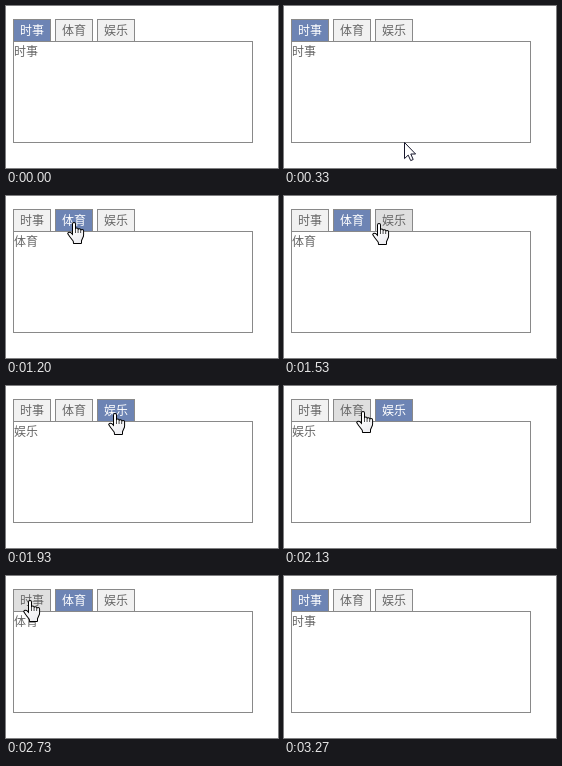
An HTML page with a canvas that plays this animation: 272 by 162 pixels, repeating every 3.34 s.

```html
<!DOCTYPE html>
<html lang="zh-CN">
<head>
<meta charset="utf-8">
<title>Tabs</title>
<style>
  html, body { margin: 0; width: 100%; height: 100%; overflow: hidden; background: #fff; }
  canvas { display: block; width: 272px; height: 162px; }
</style>
</head>
<body>
<canvas id="stage" width="272" height="162"></canvas>
<script>
const ctx = document.getElementById('stage').getContext('2d');
const LOOP = 3340, TICK = 200 / 3, LAST = 49;
const LABELS = ['时事', '体育', '娱乐'];
const TAB = { x: 7, y: 13, w: 38, h: 23, step: 42 };
const BORDER = '#898989', TEXT = '#666';

// The pointer enters, glides between a few stops and leaves; times are in ticks.
const ENTER = { at: 4, x: 135, y: 151 }, LEAVE = 48;
const MOVES = [
  { from: 4, to: 5, x: 120, y: 136 },
  { from: 7, to: 11, x: 66, y: 55 },
  { from: 11, to: 15, x: 67, y: 26 },
  { from: 20, to: 25, x: 108, y: 27 },
  { from: 29, to: 34, x: 62, y: 24 },
  { from: 38, to: 41, x: 23, y: 24 },
  { from: 47, to: 48, x: 19, y: 45 }
];
const CLICKS = [18, 29, 38, 47];

const ARROW = new Path2D('M.5 .5V16.6L4.2 13.1L6.7 18.6L9.2 17.5L6.8 12H11.6Z');
const HAND = makeHand();

function makeHand() {
  const hand = new Path2D('M6 11H16V14L14 18.5V21H7L6.7 19L3.2 14.5L1.2 11.5L2 10.7L3.5 11L6 13.5Z');
  for (let i = 0; i < 4; i++) {
    const top = i ? 5.7 + 0.8 * i : 1;
    hand.roundRect(6 + 2.7 * i, top, 2, 14 - top, 1);
  }
  return hand;
}

const smooth = k => k * k * (3 - 2 * k);

function pointerAt(n) {
  if (n < ENTER.at || n > LEAVE) return null;
  let { x, y } = ENTER;
  for (const m of MOVES) {
    const k = smooth(Math.min(1, Math.max(0, (n - m.from) / (m.to - m.from))));
    x += (m.x - x) * k;
    y += (m.y - y) * k;
  }
  return { x: Math.round(x), y: Math.round(y) };
}

function tabUnder(p) {
  if (!p || p.y < TAB.y || p.y >= TAB.y + TAB.h) return -1;
  return LABELS.findIndex((_, i) => {
    const dx = p.x - TAB.x - i * TAB.step;
    return dx >= 0 && dx < TAB.w;
  });
}

function selectedAt(n) {
  const click = CLICKS.filter(c => c <= n).pop();
  return click ? tabUnder(pointerAt(click)) : 0;
}

function box(x, y, w, h, fill) {
  ctx.fillStyle = BORDER;
  ctx.fillRect(x, y, w, h);
  ctx.fillStyle = fill;
  ctx.fillRect(x + 1, y + 1, w - 2, h - 2);
}

function label(text, x, y, color) {
  ctx.fillStyle = color;
  ctx.fillText(text, x, y);
}

function drawArrow(p) {
  ctx.save();
  ctx.translate(p.x, p.y);
  ctx.fillStyle = '#fff';
  ctx.strokeStyle = '#15152a';
  ctx.fill(ARROW);
  ctx.stroke(ARROW);
  ctx.restore();
}

function drawHand(p) {
  ctx.save();
  ctx.translate(p.x - 6, p.y);
  const shade = ctx.createLinearGradient(4, 4, 16, 20);
  shade.addColorStop(0, '#fff');
  shade.addColorStop(1, '#ececf0');
  ctx.lineJoin = 'round';
  ctx.lineWidth = 2;
  ctx.strokeStyle = '#000';
  ctx.stroke(HAND);
  ctx.fillStyle = shade;
  ctx.fill(HAND);
  ctx.restore();
}

function draw(n) {
  const pointer = pointerAt(n), hover = tabUnder(pointer), selected = selectedAt(n);

  ctx.fillStyle = '#fff';
  ctx.fillRect(0, 0, 272, 162);
  ctx.font = '12px "Noto Sans CJK SC", "Noto Sans CJK", sans-serif';
  box(7, 35, 240, 102, '#fff');
  LABELS.forEach((text, i) => {
    const x = TAB.x + i * TAB.step, on = i === selected;
    box(x, TAB.y, TAB.w, TAB.h, on ? '#6d84b4' : i === hover ? '#dfdfdf' : '#f1f1f1');
    label(text, x + 7, 29, on ? '#fff' : TEXT);
  });
  label(LABELS[selected], 8, 50, TEXT);
  if (hover >= 0) drawHand(pointer);
  else if (pointer) drawArrow(pointer);
}

function loop() {
  const t = performance.now() % LOOP;
  draw(Math.min(LAST, Math.floor((t + 4) / TICK)));
  requestAnimationFrame(loop);
}
loop();
</script>
</body>
</html>
```
